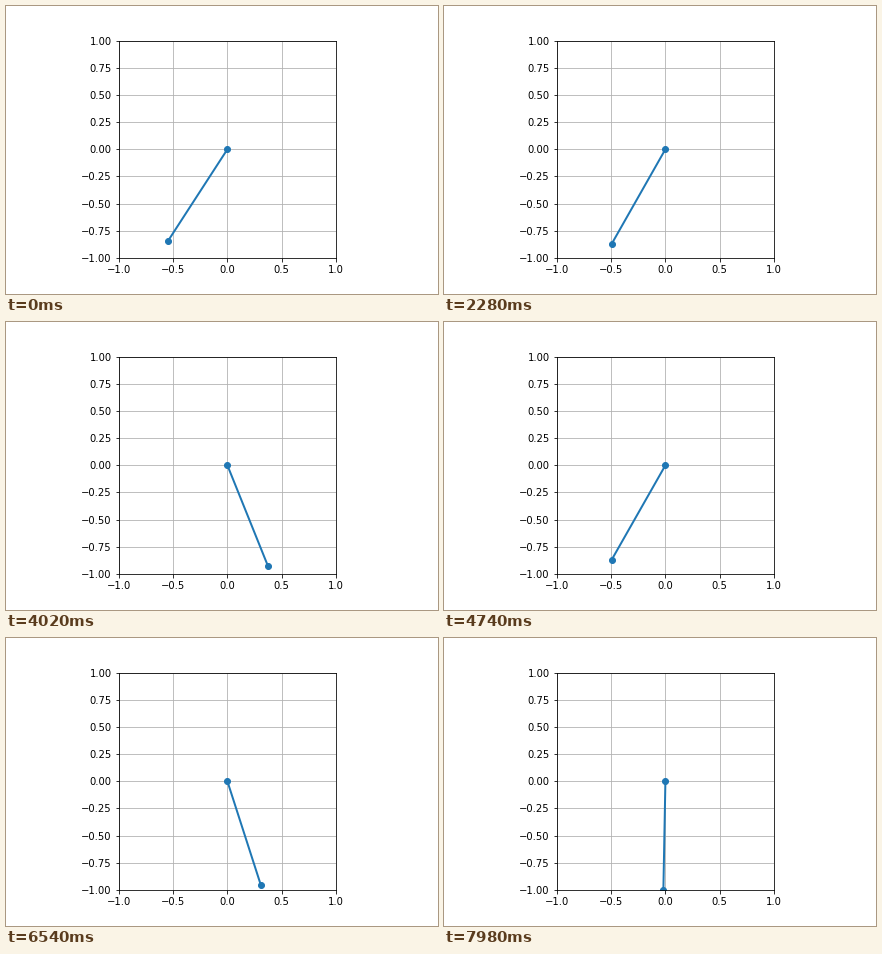
Write a matplotlib script that moves like this. It is 432x288 px and loops after 8 s.

```python
import numpy as np
import matplotlib.pyplot as plt
from matplotlib.animation import FuncAnimation

GRAVITY = 9.8
LENGTH = 1.0
START = -0.575      # released from rest, radians from the vertical
STEP = 0.05         # simulated seconds per pose
POSES = 134
TICK = 20           # ms; each pose is held for three ticks
HOLD = 3
LOOP = 8000


def rates(state):
    angle, speed = state
    return np.array([speed, -GRAVITY / LENGTH * np.sin(angle)])


def rk4(state, h):
    a = rates(state)
    b = rates(state + h / 2 * a)
    c = rates(state + h / 2 * b)
    d = rates(state + h * c)
    return state + h / 6 * (a + 2 * b + 2 * c + d)


def swing():
    state = np.array([START, 0.0])
    angles = []
    for _ in range(POSES):
        angles.append(state[0])
        for _ in range(5):
            state = rk4(state, STEP / 5)
    return np.array(angles)


angles = swing()

plt.rcParams["font.family"] = "DejaVu Sans"
fig, ax = plt.subplots(figsize=(6, 4), dpi=72)
fig.subplots_adjust(left=0.125, right=0.9, bottom=0.125, top=0.88)
ax.set_aspect("equal")
ax.set_xlim(-1, 1)
ax.set_ylim(-1, 1)
ax.set_xticks(np.linspace(-1, 1, 5))
ax.set_yticks(np.linspace(-1, 1, 9))
ax.grid()
rod, = ax.plot([], [], "o-", lw=2)


def update(i):
    angle = angles[i // HOLD]
    rod.set_data([0, LENGTH * np.sin(angle)], [0, -LENGTH * np.cos(angle)])
    return rod,


anim = FuncAnimation(fig, update, frames=LOOP // TICK, interval=TICK,
                     init_func=lambda: update(0), repeat=True, repeat_delay=0)
plt.show()
```
